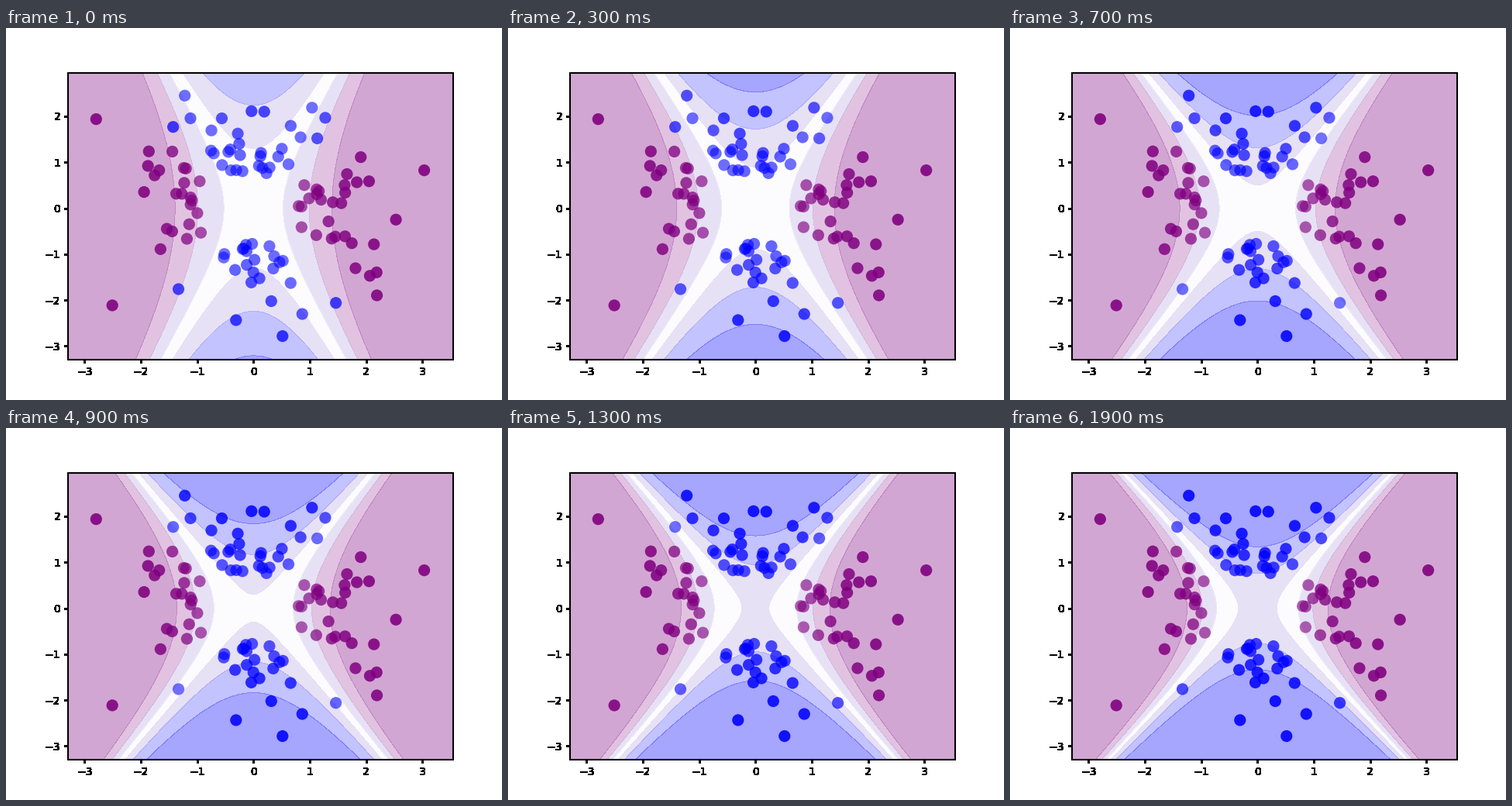
Animation of 640x480 px, one loop 2000 ms. Source, as a matplotlib script:

```python
import numpy as np
import matplotlib.pyplot as plt
from matplotlib.animation import FuncAnimation
from matplotlib.colors import to_rgba

FRAMES, INTERVAL = 20, 100
SAMPLES, GAP, MARGIN = 200, 0.5, 0.5

# Normal samples, keeping those clear of the diagonals |x| = |y|
rng = np.random.RandomState(1)
x, y = rng.randn(SAMPLES, 2).T
side = x**2 - y**2
keep = np.abs(side) > GAP
x, y, side = x[keep], y[keep], side[keep]

base = np.where(side[:, None] > 0, to_rgba("purple"), to_rgba("blue"))
xlim = x.min() - MARGIN, x.max() + MARGIN
ylim = y.min() - MARGIN, y.max() + MARGIN
gx, gy = np.meshgrid(np.linspace(*xlim, 341), np.linspace(*ylim, 313))

LEVELS = np.arange(8) * 0.15
LAVENDER = "#bda9e5"
BANDS = ["purple", "#aa55aa", LAVENDER, "#f9f9ff", LAVENDER, "#5555ff", "blue"]


def prob(x, y, step):
    """Probability of blue while the logistic model is being trained."""
    t = step / (FRAMES - 1)
    wx = 0.922 + 0.116 * t + 0.875 * t**2 - 0.439 * t**3
    wy = 0.208 + 0.720 * t - 0.020 * t**2
    bias = 0.054 + 0.526 * t + 0.448 * t**2 - 0.451 * t**3
    return 1 / (1 + np.exp(wx * x**2 - wy * y**2 - bias))


def harden(image, dpi):
    """Make every touched pixel solid black, without smooth edges."""
    out = np.zeros_like(image)
    out[..., 3] = image[..., 3] > 0
    return out, 0, 0


fig = plt.figure(figsize=(6.4, 4.8), dpi=100, facecolor="white")

# Hard-edged ticks, labels and outer border lie behind the plot itself
back = fig.add_subplot()
back.set(xlim=xlim, ylim=ylim, xticks=range(-3, 4), yticks=range(-3, 3))
for part in (back.xaxis, back.yaxis, *back.spines.values()):
    part.set_agg_filter(harden)

ax = fig.add_axes(back.get_position(), label="plot")
ax.set(xticks=[], yticks=[])
dots = ax.scatter(x, y, s=120, c=base, linewidths=0, zorder=2)
state = {"bands": None}


def update(step):
    if state["bands"] is not None:
        state["bands"].remove()
    state["bands"] = ax.contourf(gx, gy, prob(gx, gy, step), levels=LEVELS,
                                 colors=BANDS, alpha=0.35, zorder=1)
    ax.set(xlim=xlim, ylim=ylim)

    # Dots grow more solid with the confidence of their prediction
    p = prob(x, y, step)
    rgba = base.copy()
    rgba[:, 3] = 0.2 + 0.7 * np.maximum(p, 1 - p)
    dots.set_facecolors(rgba)
    return [dots]


anim = FuncAnimation(fig, update, frames=FRAMES, interval=INTERVAL,
                     init_func=lambda: update(0), repeat=True,
                     repeat_delay=0, blit=False)
plt.show()
```
